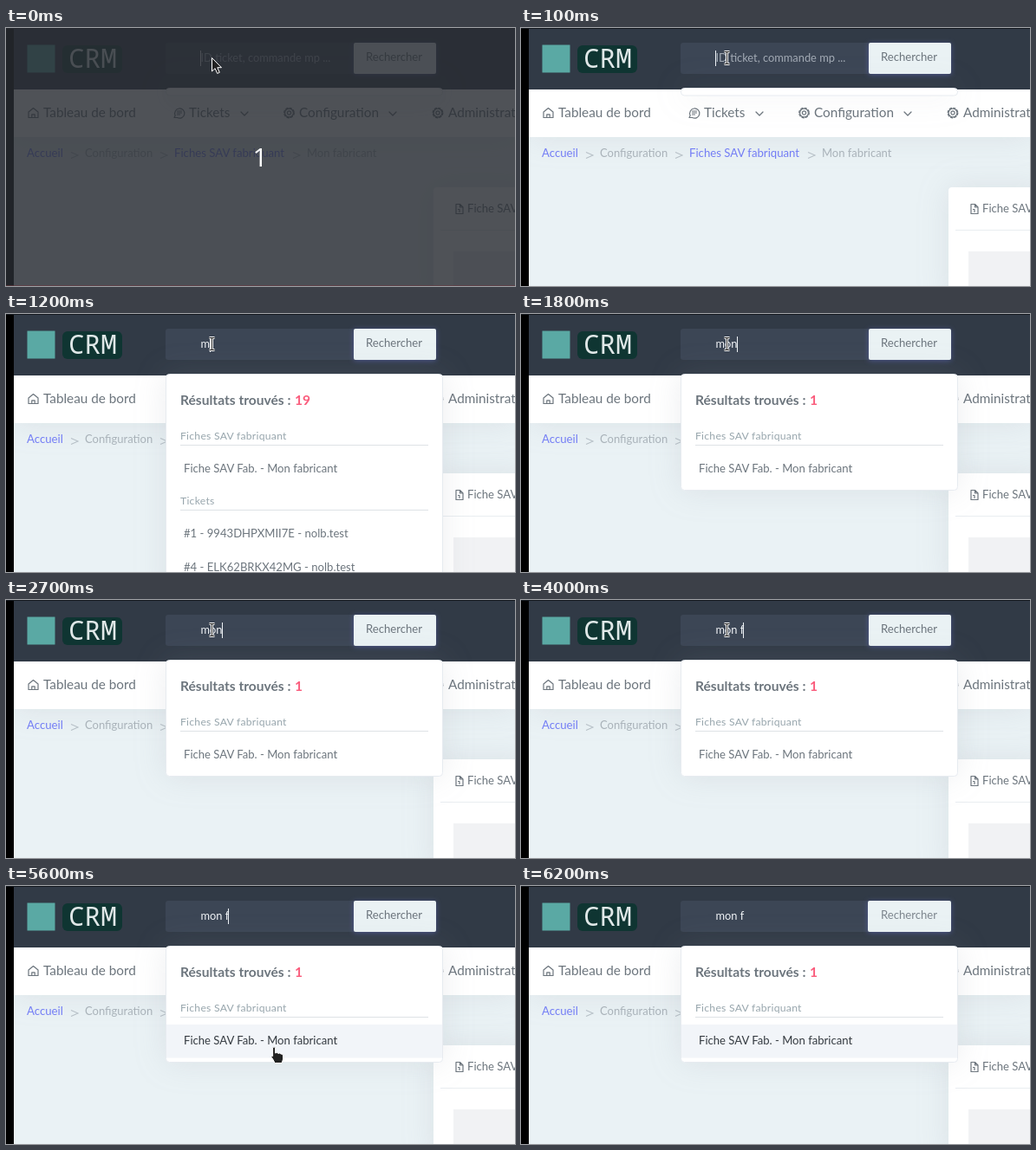
Animation, 587 px wide and 298 px high, one loop 6400 ms. Source, as an HTML page:

```html
<!DOCTYPE html>
<html lang="fr">
<head>
<meta charset="utf-8">
<title>CRM</title>
<style>
  html, body { margin: 0; width: 100%; height: 100%; overflow: hidden; background: #000; }
  svg { display: block; width: 587px; height: 298px; }
  text { font: 13.1px Lato, sans-serif; fill: #6c757d; white-space: pre; }
  .nav text { font-size: 15.3px; }
  .crumbs text { font-size: 13px; fill: #a9b2b9; }
  .crumbs .link { font-size: 13.2px; fill: #727cf5; }
  .chevron { fill: none; stroke: #b7c0c7; stroke-width: 1.1; }
  .title { font-size: 15.6px; font-weight: 700; }
  .count { fill: #fa5c7c; }
  .group { font-size: 12.2px; letter-spacing: .25px; fill: #98a6ad; }
  .brand { font: 31px "Noto Sans Mono", monospace; fill: #e0e8e8; }
  .digit { font: 30px "Open Sans", sans-serif; fill: #fff; text-anchor: middle; }
  .icon { fill: none; stroke: #6c757d; stroke-width: 1.2; stroke-linejoin: round; stroke-linecap: round; }
  .soft { filter: drop-shadow(0 0 17.5px rgba(140, 148, 160, .17)); }
  .glow { filter: drop-shadow(0 1px 3px rgba(114, 124, 245, .4)); }
  .lit { fill: #343a40; }
  #query { font-size: 12.85px; }
</style>
</head>
<body>
<svg viewBox="0 0 587 298">
  <defs>
    <g id="gear" class="icon">
      <circle r="4.9"/>
      <circle r="5.8" stroke-dasharray="2.4 2.15"/>
      <circle r="2.1"/>
    </g>
    <path id="chevron" class="icon" d="M-4-2 0 2 4-2"/>
    <path id="sep" class="chevron" d="M0 0 8 3.5 0 7"/>
  </defs>

  <rect x="9" y="71" width="578" height="227" fill="#eaf2f5"/>

  <g class="soft"><rect x="493" y="184" width="110" height="130" rx="4" fill="#fff"/></g>
  <rect x="501" y="233" width="86" height="1" fill="#e9edf1"/>
  <rect x="516" y="258" width="71" height="40" fill="#f1f2f4"/>
  <path class="icon" d="M519 203.5h4.5l3.5 3.5v7.5h-8zM523.5 203.5v3.5h3.5M521.5 209.5h1.5v3"/>
  <text x="532" y="213">Fiche SAV Fab.</text>

  <g class="nav">
    <rect class="soft" x="9" y="71" width="578" height="55" fill="#fff"/>
    <path class="icon" d="M26 97l5.5-4.5 5.5 4.5v6.5H26zM29.8 103.5v-3.6h3.4v3.6"/>
    <text x="43" y="103">Tableau de bord</text>
    <path class="icon" d="M194 103.5l1.2-2.5a5.6 5.6 0 1 1 2.4 2.5zM197.5 96h5M197.5 98h5M197.5 100h3"/>
    <text x="211" y="103">Tickets</text>
    <use href="#chevron" x="275" y="99"/>
    <use href="#gear" x="326.5" y="98"/>
    <text x="338" y="103">Configuration</text>
    <use href="#chevron" x="446" y="99"/>
    <use href="#gear" x="498" y="98"/>
    <text x="510" y="103">Administration</text>
  </g>

  <g class="crumbs">
    <text class="link" x="24" y="149">Accueil</text>
    <use href="#sep" x="75" y="143.5"/>
    <text x="91" y="149">Configuration</text>
    <use href="#sep" x="178" y="143.5"/>
    <text class="link" x="194" y="149">Fiches SAV fabriquant</text>
    <use href="#sep" x="331" y="143.5"/>
    <text x="347" y="149">Mon fabricant</text>
  </g>

  <rect width="9" height="298"/>
  <rect x="9" width="578" height="71" fill="#313a46"/>
  <rect width="587" height="1" fill="#14191f"/>
  <rect x="24.5" y="19.5" width="32" height="32" fill="#5aa9a4"/>
  <rect x="65" y="20" width="69" height="32" rx="6" fill="#0f3532"/>
  <text class="brand" x="72" y="46">CRM</text>

  <rect x="184" y="17" width="220" height="36" rx="3" fill="#3c4655"/>
  <g class="glow"><rect id="button" x="401" y="17" width="95" height="36" rx="2" fill="#eaf2f4"/></g>
  <text id="buttonText" x="415" y="38">Rechercher</text>
  <text id="query" x="224.5" y="38.5"></text>
  <rect id="caret" y="26" width="1" height="18" fill="#eef2f6"/>

  <g class="soft">
    <rect id="panel" x="184.5" y="69.5" width="319" rx="4" fill="#fff" stroke="#e7ebf0"/>
  </g>
  <g id="results">
    <text class="title" x="201" y="105">Résultats trouvés :</text>
    <text class="title count" id="count" x="333" y="105"></text>
    <text class="group" x="201" y="145">Fiches SAV fabriquant</text>
    <rect x="201" y="151" width="286" height="1" fill="#dee2e6"/>
    <rect id="rowBack" x="185" y="160" width="318" height="38.5" fill="#f2f5f9"/>
    <text id="rowText" x="205" y="183">Fiche SAV Fab. - Mon fabricant</text>
    <g id="tickets">
      <text class="group" x="201" y="220">Tickets</text>
      <rect x="201" y="226" width="286" height="1" fill="#dee2e6"/>
      <text x="205" y="258">#1 - 9943DHPXMII7E - nolb.test</text>
      <text x="205" y="297">#4 - ELK62BRKX42MG - nolb.test</text>
    </g>
  </g>

  <g id="countdown">
    <rect width="587" height="298" fill="#292c32" opacity=".82"/>
    <rect y="297" width="587" height="1" fill="#6a3a40" opacity=".6"/>
    <text class="digit" x="293" y="160">1</text>
  </g>

  <g id="pointer" stroke="#fff" stroke-linejoin="round">
    <path id="arrow" fill="#222" d="M0 0V15.5L3.6 12.2 6.2 18 8.8 16.8 6.3 11.2H11Z"/>
    <path id="hand" fill="#222" d="M-1.4 0Q0-2.4 1.6 0V6Q4 4.6 5 6.4 7 5.4 8 7 10.6 6.6 10.6 9V13Q10 15 9 17.5H1Q-1 13-3 10.5-3 8-1.4 9.5Z"/>
    <g id="beam" fill="none">
      <path stroke-width="3" d="M-3-7H3M0-7V7M-3 7H3"/>
      <path stroke="#222" d="M-3-7H3M0-7V7M-3 7H3"/>
    </g>
  </g>
</svg>
<script>
const LOOP = 6400, STEP = 100;
const ui = {};
document.querySelectorAll('[id]').forEach(el => ui[el.id] = el);

// time, text, caret x
const typing = [
  [0, '', 224], [900, 'm', 235], [1500, 'mo', 242],
  [1600, 'mon', 249], [3700, 'mon ', 252], [4000, 'mon f', 256]
];
// the caret starts visible and flips at each of these times
const caretFlips = [300, 800, 2100, 2700, 3300, 3700, 4600, 5200, 5800];
// time, x, y
const route = [
  [0, 237.5, 34.5], [4100, 237.5, 34.5], [4700, 309, 175], [4800, 304, 181],
  [4900, 308, 183], [5500, 308, 183], [5600, 309, 187], [6100, 440, 28], [6200, 450, -30], [LOOP, 450, -30]
];

const show = (el, on) => el.setAttribute('display', on ? 'inline' : 'none');
const latest = (list, t) => list.filter(item => item[0] <= t).pop();

function pointerAt(t) {
  const next = route.findIndex(p => p[0] > t);
  const [t0, x0, y0] = route[next - 1], [t1, x1, y1] = route[next];
  const k = (t - t0) / (t1 - t0), e = k * k * (3 - 2 * k);
  return [x0 + (x1 - x0) * e, y0 + (y1 - y0) * e];
}

function pointerKind(t, x, y) {
  if (t < 100) return 'arrow';
  if (y > 17 && y < 53) return x < 401 ? 'beam' : 'hand';
  return y > 160 && y < 198 ? 'hand' : 'arrow';
}

function drawSearch(t) {
  const [, text, caretX] = latest(typing, t);
  ui.query.textContent = text || 'ID ticket, commande mp ...';
  ui.query.style.fill = text ? '#f1f4f7' : '#a3abb5';
  ui.caret.setAttribute('x', caretX);
  show(ui.caret, caretFlips.filter(f => f <= t).length % 2 === 0);

  const hover = t >= 6000;
  ui.button.setAttribute('x', hover ? 400 : 401);
  ui.button.setAttribute('width', hover ? 96 : 95);
  ui.buttonText.style.fill = hover ? '#7d868e' : '#6c757d';
}

function drawResults(t) {
  const open = t >= 1200, narrowed = t >= 1800, lit = t >= 4600;
  ui.panel.setAttribute('height', narrowed ? 134 : open ? 260 : 8.5);
  show(ui.results, open);
  show(ui.tickets, !narrowed);
  show(ui.rowBack, lit);
  ui.count.textContent = narrowed ? '1' : '19';
  ui.rowText.classList.toggle('lit', lit);
}

function drawPointer(t) {
  const [x, y] = pointerAt(t), kind = pointerKind(t, x, y);
  ui.pointer.setAttribute('transform', `translate(${x} ${y})`);
  for (const name of ['arrow', 'hand', 'beam']) show(ui[name], name === kind);
}

function render(time) {
  const t = Math.floor(time % LOOP / STEP) * STEP;
  drawSearch(t);
  drawResults(t);
  drawPointer(t);
  show(ui.countdown, t < 100);
}

const start = performance.now();
function tick() {
  render(Math.max(0, performance.now() - start));
  requestAnimationFrame(tick);
}
tick();
</script>
</body>
</html>
```
